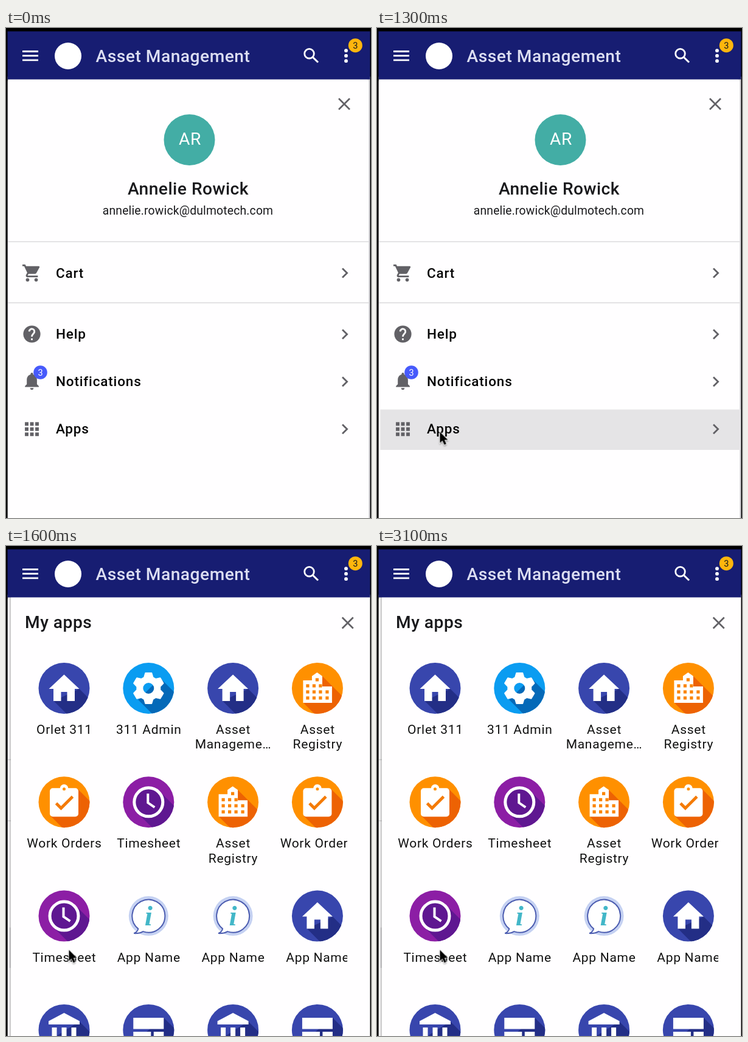
An HTML page that plays this animation: 600 by 806 pixels, repeating every 3.2 s.

```html
<!DOCTYPE html>
<html lang="en">
<head>
<meta charset="utf-8">
<title>Asset Management</title>
<style>
  html, body { margin: 0; width: 100%; height: 100%; overflow: hidden; background: #000; }
  svg { display: block; }
  text { font-family: Roboto, sans-serif; fill: #19191c; }
  .title { font-size: 28.2px; font-weight: 500; letter-spacing: .48px; }
  .row { font-size: 22.5px; font-weight: 500; letter-spacing: .82px; fill: #050505; }
  .label { font-size: 21px; letter-spacing: .7px; fill: #111; }
  .badge { font-size: 14.5px; }
  .mid { text-anchor: middle; }
  .grey { fill: #626166; }
  .hover { animation: hover 3.2s step-end infinite; }
  .panel { animation: slide 3.2s step-end infinite; }
  .cursor { animation: point 3.2s step-end infinite; }
  @keyframes hover {
    0% { opacity: 0 }
    31.25%, 100% { opacity: 1 }
  }
  @keyframes slide {
    0% { transform: translateX(620px) }
    43.75% { transform: translateX(544px) }
    46.875% { transform: translateX(74.5px) }
    50%, 100% { transform: none }
  }
  @keyframes point {
    0% { transform: translate(135px, 900px) }
    25% { transform: translate(135px, 780px) }
    28.125% { transform: translate(121.5px, 616.5px) }
    31.25% { transform: translate(107px, 653px) }
    34.375%, 100% { transform: translate(103.5px, 664.5px) }
  }
</style>
</head>
<body>
<svg width="600" height="806" viewBox="0 0 600 806">
  <defs>
    <clipPath id="disc"><circle r="42"/></clipPath>
    <clipPath id="list"><rect x="8" y="86" width="553" height="720"/></clipPath>
    <filter id="edge" x="-5%" y="-5%" width="110%" height="110%">
      <feDropShadow dx="-1" dy="0" stdDeviation="2" flood-opacity=".38"/>
    </filter>
    <filter id="soft" x="-50%" y="-50%" width="200%" height="200%">
      <feDropShadow dx="0" dy="1.5" stdDeviation="1.2" flood-opacity=".4"/>
    </filter>
    <path id="chevron" d="M-4 -7.5 L3.6 0 L-4 7.5" fill="none" stroke="#626166" stroke-width="2.8"/>
    <path id="close" d="M-9 -9 L9 9 M9 -9 L-9 9" stroke="#626166" stroke-width="2.7"/>

    <path id="home" d="M-5 21v-15h10v15h12.5v-20h7.5L0-22.5-25 1h7.5v20z" fill="#fff"/>
    <g id="gear">
      <circle r="14.5" fill="none" stroke="#fff" stroke-width="11"/>
      <g id="teeth" fill="#fff" stroke="#fff" stroke-width="2" stroke-linejoin="round"></g>
    </g>
    <g id="building">
      <path d="M-23.5 24V-13H-9V-20L-.5-26 8-20V-3H24V24z" fill="#fff"/>
      <g id="windows" fill="#fb8505"></g>
    </g>
    <g id="clipboard">
      <rect x="-23.5" y="-23" width="47" height="47" rx="5" fill="#fff"/>
      <circle cy="-22.5" r="6.8" fill="#fff"/>
      <circle cy="-21.5" r="2.5" fill="#ff9000"/>
      <path d="M-13 2L-5 10L14-9" fill="none" stroke="#f47b05" stroke-width="4.8"/>
    </g>
    <g id="clock" fill="none" stroke="#fff">
      <circle r="23.5" fill="#5f1791" stroke-width="5"/>
      <path d="M-1-14V1L10 8.5" stroke-width="4"/>
    </g>
    <path id="bank" fill="#fff" d="M0-28L-25.5-14.5V-9H25.5V-14.5z
      M-20-4h8v19h-8z M-4-4h8v19h-8z M12-4h8v19h-8z"/>
    <path id="board" fill="#fff" d="M-25-20h50v18.5h-50z M-25 3h29v18h-29z M8.5 3h16.5v18h-16.5z"/>
    <g id="info">
      <circle r="32.5" fill="#c5d1f2"/>
      <path d="M-17 21 A27 27 0 1 1 -9 25.5 Q-15 29 -24 28.5 Q-18 26 -17 21z"
        fill="#fff" stroke="#4b5cb0" stroke-width="2"/>
      <text class="mid" y="15.5" style="font:italic 700 47px 'Liberation Serif',serif;fill:#43b7c8">i</text>
    </g>
  </defs>

  <rect x="2.5" y="80" width="598" height="726" fill="#d9d8dc"/>
  <rect x="2.5" y="84.5" width="593.5" height="730" rx="4" fill="#fffeff"/>
  <rect class="hover" x="5.5" y="627.5" width="593" height="66.5" fill="#e5e4e6"/>
  <path d="M3 351.5H596M3 452H596" stroke="#dad9dc" stroke-width="1.6"/>

  <use href="#close" x="556" y="125"/>
  <circle cx="301.5" cy="184" r="42" fill="#43ada5"/>
  <text class="mid" x="302.5" y="192" style="font-size:28.2px;letter-spacing:.5px;fill:#fff">AR</text>
  <text class="title mid" x="299.5" y="274">Annelie Rowick</text>
  <text class="mid" x="299" y="306.5" style="font-size:19.3px;letter-spacing:.2px">annelie.rowick@dulmotech.com</text>

  <g class="grey">
    <g transform="translate(42.5 403) scale(1.41) translate(-12 -12)">
      <path d="M1 2v2h2l3.6 7.59-1.35 2.45C4.52 15.37 5.48 17 7 17h12v-2H7.42c-.2 0-.3-.2-.22-.37L8.1 13h7.45c.75 0 1.41-.41 1.75-1.03l3.58-6.49A1 1 0 0 0 20 4H5.21l-.94-2z"/>
      <circle cx="7" cy="20" r="2"/><circle cx="17" cy="20" r="2"/>
    </g>
    <g transform="translate(42.5 503.5) scale(1.41)">
      <circle r="10"/>
      <path d="M-3-3A3 3 0 1 1 2.1-.9C.8.4 0 1 0 3" fill="none" stroke="#fff" stroke-width="2"/>
      <path d="M-1 5h2v2h-2z" fill="#fff"/>
    </g>
    <path d="M42.5 567a2.1 2.1 0 0 1 2.1 2.1v1c4.2 1 6.3 4.5 6.3 9v7l3 3v1.4H31.2v-1.4l3-3v-7c0-4.5 2.1-8 6.2-9v-1a2.1 2.1 0 0 1 2.1-2.1zM39.7 592.3h5.6a2.8 2.8 0 0 1-5.6 0z"/>
    <g id="dots"></g>
  </g>
  <circle cx="56.5" cy="566.5" r="11.3" fill="#475afb"/>
  <text class="badge mid" x="56.5" y="572" style="fill:#fff">3</text>
  <g id="rows"></g>

  <g class="panel">
    <rect x="8" y="82" width="620" height="740" fill="#fffeff" filter="url(#edge)"/>
    <text class="title" x="31" y="135">My apps</text>
    <use href="#close" x="561.7" y="126.5"/>
    <g id="apps" clip-path="url(#list)"></g>
  </g>

  <path d="M0 0H600V806H598.5V5.5H2.5V806H0z"/>
  <rect x="2.5" y="5.5" width="596" height="79" fill="#171d72"/>
  <path d="M27 38.5H53M27 45.7H53M27 52.8H53" stroke="#fff" stroke-width="2.8"/>
  <circle cx="102" cy="46" r="22" fill="#fff"/>
  <text class="title" x="147.5" y="56" style="fill:#dcdef2">Asset Management</text>
  <g fill="none" stroke="#fff" stroke-width="2.8">
    <circle cx="498.5" cy="42.2" r="7.8"/>
    <path d="M504 47.7L513 56.5" stroke-width="3"/>
  </g>
  <g fill="#fff">
    <circle cx="559" cy="37.2" r="2.9"/><circle cx="559" cy="45.7" r="2.9"/><circle cx="559" cy="54.2" r="2.9"/>
  </g>
  <circle cx="574.3" cy="28.7" r="11.5" fill="#ffb60d"/>
  <text class="badge mid" x="574.3" y="34">3</text>

  <path class="cursor" d="M0 0V18L4 14.2 7.2 21 10.4 19.6 7.4 13H13z"
    stroke="#fff" stroke-width="1.5" paint-order="stroke" filter="url(#soft)"/>
</svg>
<script>
  const fill = (id, parts) => document.getElementById(id).innerHTML = parts.join('');
  const square = (x, y, size) =>
    `<rect x="${x - size / 2}" y="${y - size / 2}" width="${size}" height="${size}"/>`;

  fill('teeth', [0, 60, 120, 180, 240, 300].map(angle =>
    `<path d="M-8-15L-5-25H5L8-15z" transform="rotate(${angle})"/>`));
  fill('windows', [
    ...[-4, 6, 16].flatMap(y => [-16, -5.5, 5, 16].map(x => [x, y])).filter(([x, y]) => x < 16 || y > 0),
    [-0.5, -14]
  ].map(([x, y]) => square(x, y, 5.2)));
  fill('dots', [-8.5, 0, 8.5].flatMap(y => [-8.5, 0, 8.5].map(x => square(42.5 + x, 659.8 + y, 5.9))));

  const rows = { Cart: 403, Help: 503.7, Notifications: 581.7, Apps: 659.7 };
  fill('rows', Object.entries(rows).map(([name, y]) =>
    `<text class="row" x="82" y="${y + 7.5}">${name}</text><use href="#chevron" x="557" y="${y}"/>`));

  // Each kind: disc colour, shade colour, then the two ends of the long shadow.
  const kinds = {
    home: ['#3846ad', '#232e86', 25, 1, -17, 21],
    gear: ['#0a9cf1', '#0469b8', 19, -17, -17, 19],
    building: ['#ff9000', '#ed6203', 8, -20, -23, 24],
    clipboard: ['#ff9000', '#ed6203', 22, -22, -22, 23],
    clock: ['#8c1ea5', '#5f1791', 18, -18, -18, 18],
    bank: ['#3846ad', '#232e86', 25, -14, -20, 15],
    board: ['#3846ad', '#232e86', 25, -20, -25, 21]
  };
  const disc = kind => {
    if (!kinds[kind]) return '';
    const [base, shade, x1, y1, x2, y2] = kinds[kind];
    return `<circle r="42" fill="${base}"/><path clip-path="url(#disc)" fill="${shade}"
      d="M${x1} ${y1}l60 60L${x2 + 60} ${y2 + 60}L${x2} ${y2}z"/>`;
  };

  const apps = [
    'home:Orlet 311', 'gear:311 Admin', 'home:Asset|Manageme…', 'building:Asset|Registry',
    'clipboard:Work Orders', 'clock:Timesheet', 'building:Asset|Registry', 'clipboard:Work Orders',
    'clock:Timesheet', 'info:App Name', 'info:App Name', 'home:App Name',
    'bank:', 'board:', 'bank:', 'board:'
  ];
  fill('apps', apps.map((app, i) => {
    const [kind, label] = app.split(':');
    const x = 95.5 + 138.8 * (i % 4), y = 234 + 187.3 * Math.floor(i / 4);
    const lines = label.split('|').map((line, n) =>
      `<text class="label mid" x=".4" y="${75 + 24.3 * n}">${line}</text>`);
    return `<g transform="translate(${x} ${y})">${disc(kind)}<use href="#${kind}"/>${lines.join('')}</g>`;
  }));
</script>
</body>
</html>
```
